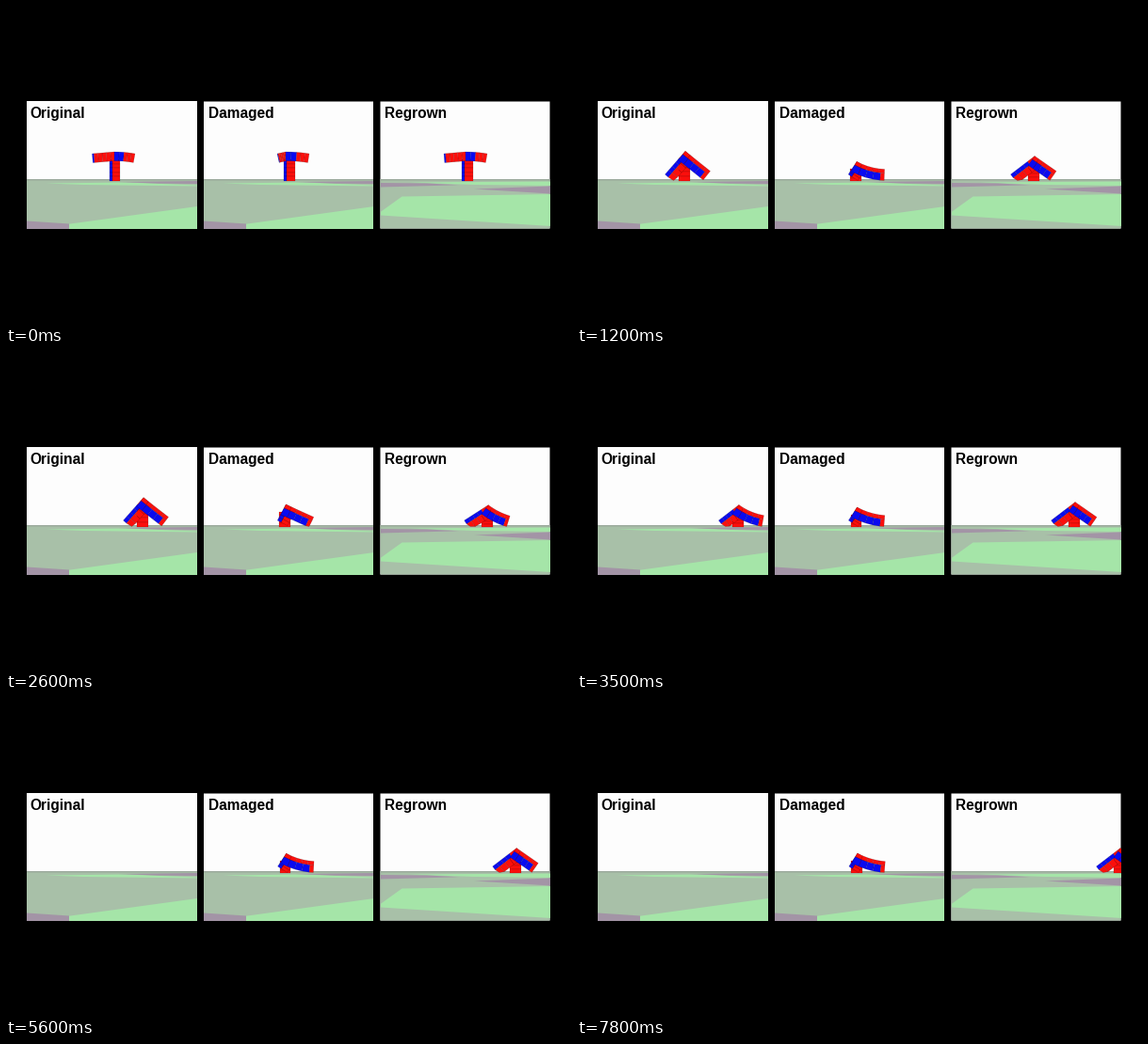
A matplotlib script that plays this animation: 600x338 px, repeating every 7.9 s.

```python
import numpy as np
import matplotlib.pyplot as plt
from matplotlib.animation import FuncAnimation
from matplotlib.collections import PolyCollection
from matplotlib.patches import Polygon, Rectangle

W, H, DPI = 600, 338, 100
FRAMES, STEP = 79, 100
MID, HORIZON, FLOOR = 169, 184, 185.5
FALL, GAIT = 700, 2150  # ms to drop from standing, ms per stride

RED, BLUE = "#fb0f0c", "#0a0af0"
SKY, SAGE, MINT, MAUVE = "#fdfdfd", "#a8c0a8", "#a5e5a8", "#a394a6"

# Cells along an arm: u from, u to, depth from, depth to, colour
STAND = dict(
    stem=[(0, 1, 0, 0.28, BLUE), (0, 1, 0.28, 1, RED)],
    left=[(0, 0.93, 0, 1, RED), (0.93, 1, 0, 1, BLUE)],
    right=[(0, 0.47, 0, 1, BLUE), (0.47, 1, 0, 1, RED)],
)
WALK = dict(
    stem=[(0, 1, 0, 1, RED)],
    left=[(0, 0.3, 0, 0.38, RED), (0.3, 1, 0, 0.38, BLUE),
          (0, 1, 0.38, 1, RED)],
    right=[(0, 1, 0, 0.36, RED), (0, 0.88, 0.36, 1, BLUE),
           (0.88, 1, 0.36, 1, RED)],
)


def smooth(x):
    x = np.clip(x, 0, 1)
    return x * x * (3 - 2 * x)


def limb(start, end, cells, side, thick, sag=0):
    """Coloured quads of a bent bar whose outer edge runs start to end."""
    start, end = np.array(start), np.array(end)
    d = end - start
    n = side * np.array([-d[1], d[0]]) / np.hypot(*d)

    def at(u, v):
        tan = d + n * 4 * sag * (1 - 2 * u)
        inward = side * np.array([-tan[1], tan[0]]) / np.hypot(*tan)
        p = start + d * u + n * 4 * sag * u * (1 - u) + inward * v * thick
        return p[0], min(p[1], FLOOR)

    quads = []
    for u0, u1, v0, v1, color in cells:
        edges = np.linspace(u0, u1, max(1, round((u1 - u0) * 5)) + 1)
        for a, b in zip(edges[:-1], edges[1:]):
            quads.append(([at(a, v0), at(b, v0), at(b, v1), at(a, v1)], color))
    return quads


class Robot:
    def __init__(self, travel, height, dip, arms, stand_arms, stem, beat, start):
        self.travel = travel          # apex x as a function of time
        self.height, self.dip = height, dip
        self.arms, self.stand_arms = arms, stand_arms
        self.stem = stem              # stem offset from the apex when standing
        self.beat, self.start = beat, start

    def cells(self, t):
        drop = smooth(t / FALL)
        wave = np.cos(2 * np.pi * (t - 1200) / GAIT)
        squash = ((1 + self.beat * wave) / 2) ** 2
        squash *= smooth((t - self.start) / 1000)

        def mix(standing, walking):
            return standing + (walking - standing) * drop

        x = self.travel(t)
        y = mix(155, self.height + self.dip * squash)
        left = x - mix(self.stand_arms[0], self.arms[0]), mix(157, 179)
        right = x + mix(self.stand_arms[1], self.arms[1]), mix(157, 175.5 - 2 * squash)
        sx = x + mix(self.stem, -1) - 5.8
        thick = mix(9.6, 12)
        look = STAND if drop < 0.5 else WALK
        return (limb((sx, y + 8), (sx, FLOOR), look["stem"], -1, 11.6)
                + limb((x, y), left, look["left"], -1, thick)
                + limb((x, y), right, look["right"], 1, thick,
                       mix(-0.5, 1.8 * squash)))


def speeding_up(t):
    return 115 + 20.6 * (max(t - 1200, 0) / 1000) ** 1.22


def stuck(t):
    return 297 + 0.0001 * t


def stumbling(t):
    return np.interp(t, [0, 1200, 3500, 4700, 7800], [488, 486, 529, 528, 577])


fig = plt.figure(figsize=(W / DPI, H / DPI), dpi=DPI, facecolor="black")
ax = fig.add_axes([0, 0, 1, 1])
ax.set_xlim(0, W)
ax.set_ylim(H, 0)
ax.axis("off")

# Ground patches, x counted from the panel's left edge
PLAIN = [
    (MINT, [(20, 188.5), (105, 187.5), (181, 190.5), (181, 191.5), (60, 190)]),
    (MAUVE, [(98, 187), (181, 186), (181, 189), (140, 188.6)]),
    (MAUVE, [(0, 228.5), (45, 231.5), (45, 237), (0, 237)]),
    (MINT, [(45, 231.7), (181, 213), (181, 237), (45, 237)]),
]
FIELD = [
    (MINT, [(30, 187.5), (181, 186.5), (181, 191), (100, 190)]),
    (MAUVE, [(0, 188), (50, 188.5), (83, 190.3), (0, 192.5)]),
    (MAUVE, [(100, 194.5), (181, 191.5), (181, 199.5)]),
    (MINT, [(23, 202.5), (181, 200), (181, 234), (0, 222.5), (0, 219)]),
]


def panel(x, w, h, label, tx, patches):
    top, bottom = MID - h / 2, MID + h / 2
    frame = Rectangle((x, top), w, h, fc=SKY, lw=0, snap=False)
    ax.add_patch(frame)
    for y0, y1, color in ((HORIZON, bottom, SAGE),
                          (HORIZON, HORIZON + 1.4, "#9aa99b")):
        ax.add_patch(Rectangle((x, y0), w, y1 - y0, fc=color, lw=0, snap=False))
    for color, pts in patches:
        patch = Polygon([(x + px, py) for px, py in pts], fc=color, lw=0)
        ax.add_patch(patch)
        patch.set_clip_path(frame)
    ax.text(tx, 119, label, family="Liberation Sans", weight="bold",
            size=15.5 * 72 / DPI, color="black", va="baseline")
    body = PolyCollection([], edgecolors=(0, 0, 0, 0.3), linewidths=0.3)
    ax.add_collection(body, autolim=False)
    body.set_clip_path(frame)
    return body


actors = [
    (panel(22, 181, 136, "Original", 25.5, PLAIN),
     Robot(speeding_up, 154.3, 9, (21.5, 26.5), (23.5, 22), 0.5, 1, 1500)),
    (panel(210, 180, 135, "Damaged", 214.6, PLAIN),
     Robot(stuck, 161.8, 3.5, (9, 29.5), (9, 25), 4, 1, 0)),
    (panel(397.5, 180, 135, "Regrown", 402.2, FIELD),
     Robot(stumbling, 159.5, 5, (25.5, 23), (23, 23), 2, -1, 0)),
]


def draw(i):
    for body, robot in actors:
        quads, colors = zip(*robot.cells(i * STEP))
        body.set_verts(quads)
        body.set_facecolor(colors)
    return [body for body, _ in actors]


anim = FuncAnimation(fig, draw, frames=FRAMES, interval=STEP,
                     repeat=True, repeat_delay=0, blit=False)
plt.show()
```
